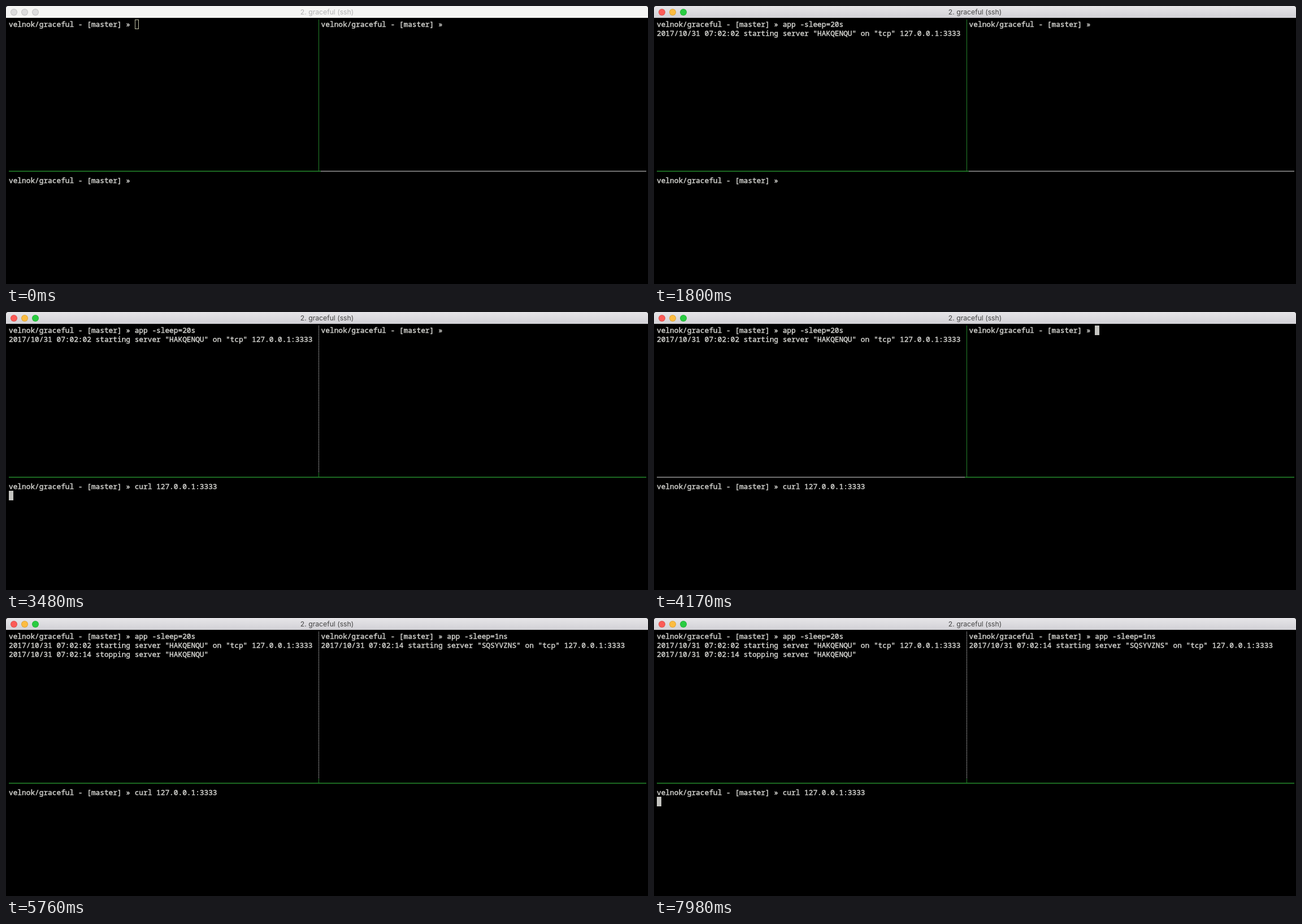
Animation, 1136 px wide and 493 px high, one loop 8 s. Source, as an HTML page:

```html
<!DOCTYPE html>
<html lang="en">
<head>
<meta charset="utf-8">
<title>Terminal</title>
<style>
  html, body { margin: 0; width: 100%; height: 100%; overflow: hidden; background: #000; }
  #stage { position: relative; width: 1136px; height: 493px; overflow: hidden; background: #000; }
  #stage > * { position: absolute; }

  #bar {
    left: 0; top: 0; width: 1136px; height: 21px; border-radius: 4px 4px 0 0;
    background: linear-gradient(#e6e5e8, #d2d1d6);
    font: 12.2px/22px Inter, "Liberation Sans", sans-serif; color: #454545; text-align: center;
  }
  #bar i {
    position: absolute; top: 5px; width: 12px; height: 12px; border-radius: 50%;
    box-sizing: border-box; border: 1px solid rgba(0, 0, 0, .12);
  }
  #bar i:nth-of-type(1) { left: 7.5px; background: #fc5b57; }
  #bar i:nth-of-type(2) { left: 26.5px; background: #fdbc40; }
  #bar i:nth-of-type(3) { left: 45.5px; background: #29cc41; }
  .idle #bar { background: #f5f5f3; color: #b2b2b2; }
  .idle #bar i { background: #dcdcdc; }

  pre {
    margin: 0; color: #d2d2ce; -webkit-text-stroke: .45px #d2d2ce;
    font: 12.8px/16px "Noto Sans Mono", "DejaVu Sans Mono", monospace;
    font-variant-ligatures: none;
  }
  #cursor { width: 7.7px; height: 16.5px; box-sizing: border-box; background: #c4c4c0; }
  .idle #cursor { background: none; border: 1px solid #c4c4a8; }

  .line { --tone: #8c8c8c; background: var(--tone); }
  .line.on { --tone: #23822b; }
  #split, #tee { left: 553px; width: 1px; }
  #split {
    top: 24px; height: 261px;
    background: repeating-linear-gradient(var(--tone) 0 2px, #3c3c3c 2px 3px);
  }
  #split.on { background: var(--tone); }
  #tee { top: 285px; height: 8px; }
  #floorL, #floorM, #floorR { top: 292px; height: 2px; opacity: .8; }
  #floorL { left: 5px; width: 545px; }
  #floorM { left: 550px; width: 7px; }
  #floorR { left: 557px; width: 576px; }
</style>
</head>
<body>
<div id="stage">
  <div id="bar"><i></i><i></i><i></i>2. graceful (ssh)</div>
  <div class="line" id="split"></div>
  <div class="line on" id="tee"></div>
  <div class="line" id="floorL"></div>
  <div class="line on" id="floorM"></div>
  <div class="line" id="floorR"></div>
  <div id="cursor"></div>
</div>
<script>
const LOOP = 8000, COL = 7.68, ROW = 16;
const PROMPT = 'velnok/graceful - [master] » ';
const $ = id => document.getElementById(id);
const stage = $('stage');

const typed = (t, text, start, gap) =>
  text.slice(0, Math.max(0, Math.floor((t - start) / gap) + 1));
const after = (t, at, text) => t >= at ? text : '';

// Each pane's content is a function of time; the cursor sits at its end.
const panes = {
  left: { x: 5, y: 24.4, text: t => PROMPT + typed(t, 'app -sleep=20s', 460, 60)
    + after(t, 1380, '\n')
    + after(t, 1440, '2017/10/31 07:02:02 starting server "HAKQENQU" on "tcp" 127.0.0.1:3333\n')
    + after(t, 5160, '2017/10/31 07:02:14 stopping server "HAKQENQU"\n') },
  right: { x: 557.6, y: 24.4, text: t => PROMPT + typed(t, 'app -sleep=1ns', 4180, 54)
    + after(t, 5070, '\n')
    + after(t, 5160, '2017/10/31 07:02:14 starting server "SQSYVZNS" on "tcp" 127.0.0.1:3333\n') },
  bottom: { x: 5, y: 301.4, text: t => PROMPT + typed(t, 'curl 127.0.0.1:3333', 2490, 33)
    + after(t, 3180, '\n') }
};

// Pane focus changes: [time, pane]
const focus = [[0, 'left'], [2190, 'bottom'], [3900, 'left'], [4095, 'right'], [5490, 'bottom']];

for (const pane of Object.values(panes)) {
  pane.el = document.createElement('pre');
  pane.el.style.left = pane.x + 'px';
  pane.el.style.top = pane.y + 'px';
  stage.insertBefore(pane.el, $('cursor'));
}

const blinkOn = t => (t / 350 + 0.365) % 1 < 0.5;
const typing = t => (t > 430 && t < 1400) || (t > 2460 && t < 3200) || (t > 4150 && t < 5070);

function draw(t) {
  for (const pane of Object.values(panes)) {
    const text = pane.text(t);
    if (pane.shown !== text) pane.el.textContent = pane.shown = text;
  }
  const active = focus.filter(([at]) => t >= at).pop()[1];
  const idle = t < 240;
  stage.classList.toggle('idle', idle);

  $('split').classList.toggle('on', active !== 'bottom');
  $('floorL').classList.toggle('on', active !== 'right');
  $('floorR').classList.toggle('on', active !== 'left');

  const pane = panes[active];
  const rows = pane.shown.split('\n');
  const style = $('cursor').style;
  style.left = pane.x + rows[rows.length - 1].length * COL + 'px';
  style.top = pane.y + (rows.length - 1) * ROW - 0.4 + 'px';
  style.visibility = idle || typing(t) || blinkOn(t) ? 'visible' : 'hidden';
}

const begin = performance.now();
function tick() {
  draw((performance.now() - begin) % LOOP);
  requestAnimationFrame(tick);
}
tick();
</script>
</body>
</html>
```
